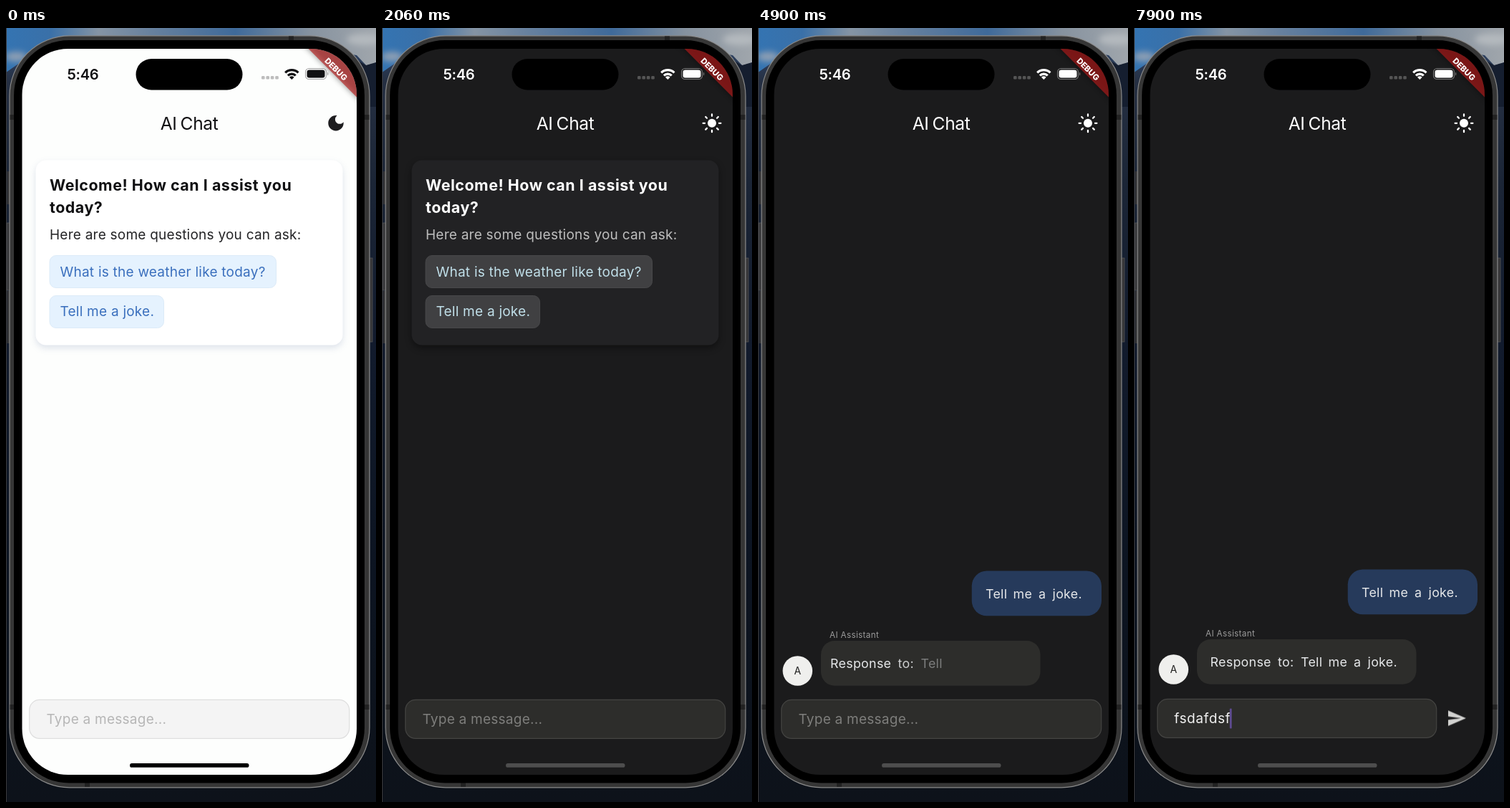
Animation of 517x1080 px, one loop 8 s. Source, as an HTML page:

```html
<!DOCTYPE html>
<html lang="en">
<head>
<meta charset="utf-8">
<title>AI Chat</title>
<style>
html, body { margin: 0; width: 100%; height: 100%; overflow: hidden; background: #0c1424; }
svg { display: block; width: 517px; height: 1080px; font: 400 19px Inter, "Noto Sans", sans-serif; }
text { white-space: pre; }

/* every step animation shares one 8 s clock */
.theme, .card, .chat, .user, .reply, .user .words, .reply .words, .field, .box,
.hint, .typed, .caret, .caret rect, .send {
  animation: 8s step-end infinite;
}

.theme { animation-name: theme; }
@keyframes theme {
  0%, 20% {
    --bg: #fdfefd; --ink: #101012; --sub: #242426; --card: #fff; --shade: rgba(40, 70, 130, .15);
    --chip: #e5f2fe; --chipEdge: #dcebf8; --chipInk: #3a6fbd; --field: #f4f4f4; --hint: #b6b6b6;
    --home: #000; --dots: #bdbdbd; --cell: #a5a5a5; --moon: 1; --sun: 0;
  }
  4.5%, 25%, 100% {
    --bg: #1b1b1c; --ink: #fff; --sub: #bebebe; --card: #222224; --shade: rgba(0, 0, 0, .4);
    --chip: #404042; --chipEdge: #48484a; --chipInk: #c0dfe9; --field: #2d2d2b; --hint: #7e7e7c;
    --home: #4e4e4e; --dots: #555; --cell: #777; --moon: 0; --sun: 1;
  }
  0%, 22% { --line: #dedede; }
  4.5%, 25% { --line: #e4e4e0; }
  5.375%, 25.75%, 100% { --line: #444442; }
  20% { --line: #a2a2a2; }
  21% { --line: #c8c8c8; }
}

.bg { fill: var(--bg); }
.ink { fill: var(--ink); }
.sub { fill: var(--sub); }
.moon { opacity: var(--moon); }
.sun { opacity: var(--sun); }
.plate { fill: var(--card); filter: drop-shadow(0 4px 5px var(--shade)); }
.chip rect { fill: var(--chip); stroke: var(--chipEdge); }
.chip text { fill: var(--chipInk); }
.soft { letter-spacing: .24px; }

.card { animation-name: card; }
@keyframes card { 0% { opacity: 1; } 47.5%, 100% { opacity: 0; } }

.user { animation-name: user; }
@keyframes user {
  0% { opacity: 0; transform: translateY(97.5px); }
  47.5% { opacity: 1; transform: translateY(97.5px); }
  59.125%, 100% { opacity: 1; transform: none; }
}
.reply { animation-name: reply; }
@keyframes reply { 0% { opacity: 0; } 59.125%, 100% { opacity: 1; } }
.chat { animation-name: lift; }
@keyframes lift { 0% { transform: none; } 94.125%, 100% { transform: translateY(-2px); } }

.words { font-size: 17.8px; letter-spacing: .32px; fill: #e6e8ea; }
.user .words { animation-name: settleUser; }
@keyframes settleUser { 0% { transform: translateX(-5.5px); } 52%, 100% { transform: none; } }
.reply .words { animation-name: settleReply; }
@keyframes settleReply { 0% { transform: translateX(-5.5px); } 67%, 100% { transform: none; } }

/* --t is the moment a word or a letter arrives */
.words text { animation: word 8s calc(var(--t) - 8s) infinite linear; }
@keyframes word {
  0% { opacity: 0; animation-timing-function: cubic-bezier(.5, 1, .89, 1); }
  2.06%, 60% { opacity: 1; }
  60.01%, 100% { opacity: 0; }
}
.typed tspan { animation: pop 8s calc(var(--t) - 8s) infinite step-end; }
@keyframes pop { 0% { visibility: visible; } 40%, 100% { visibility: hidden; } }

.field { animation-name: field; }
@keyframes field { 0% { transform: none; } 94.125%, 100% { transform: translateY(-1px); } }
.box { fill: var(--field); stroke: var(--line); stroke-width: 1.2; animation-name: box; }
@keyframes box { 0% { width: 447px; } 94.125%, 100% { width: 390px; } }
.hint { fill: var(--hint); letter-spacing: .25px; animation-name: hint; }
@keyframes hint { 0% { opacity: 1; } 94.125%, 100% { opacity: 0; } }
.typed, .send { animation-name: typed; }
@keyframes typed { 0% { opacity: 0; } 94.125%, 100% { opacity: 1; } }
.typed { letter-spacing: .6px; fill: #f0f0f0; }
.caret { animation-name: blink; }
@keyframes blink { 0% { opacity: 0; } 90.375%, 100% { opacity: 1; } }
.caret rect { animation-name: advance; }
@keyframes advance {
  0% { transform: none; }
  94.125% { transform: translateX(7.3px); }
  94.625% { transform: translateX(17.9px); }
  95.25% { transform: translateX(41.2px); }
  95.75% { transform: translateX(48.5px); }
  97.875% { transform: translateX(60.7px); }
  98.75%, 100% { transform: translateX(78.4px); }
}
</style>
</head>
<body>
<svg viewBox="0 0 517 1080">
  <defs>
    <linearGradient id="range" x2="0" y2="1">
      <stop offset="0" stop-color="#34517c"/>
      <stop offset=".07" stop-color="#252f42"/>
      <stop offset=".2" stop-color="#1b2536"/>
      <stop offset=".4" stop-color="#121b2d"/>
      <stop offset=".7" stop-color="#0c1421"/>
      <stop offset="1" stop-color="#0d121a"/>
    </linearGradient>
    <linearGradient id="sky">
      <stop offset="0" stop-color="#3474b2"/>
      <stop offset=".12" stop-color="#3a70a8"/>
      <stop offset=".25" stop-color="#8594a4"/>
      <stop offset=".4" stop-color="#66809e"/>
      <stop offset=".62" stop-color="#3f6a9a"/>
      <stop offset=".82" stop-color="#86929f"/>
      <stop offset="1" stop-color="#a0a6ac"/>
    </linearGradient>
    <filter id="blur" x="-50%" y="-50%" width="200%" height="200%"><feGaussianBlur stdDeviation="4"/></filter>
    <clipPath id="screen"><rect x="22.5" y="29" width="467.5" height="1013" rx="64"/></clipPath>
  </defs>

  <!-- wallpaper -->
  <rect width="517" height="1080" fill="url(#range)"/>
  <path d="M0 0H517V48L505 54 490 38 440 30H60L20 48 0 62Z" fill="url(#sky)"/>
  <g filter="url(#blur)">
    <ellipse cx="14" cy="40" rx="15" ry="7" fill="#8d9fb4"/>
    <ellipse cx="500" cy="16" rx="24" ry="8" fill="#b4b9be"/>
  </g>
  <path d="M470 30L489 44 503 52 517 48V110H470Z" fill="#151e2f"/>
  <rect width="1" height="1080" fill="#39393b"/>

  <!-- phone body -->
  <g fill="#343436">
    <rect x="507" y="321" width="5" height="117" stroke="#59595b" stroke-width=".7"/>
    <rect x="1.5" y="200" width="5" height="46"/>
    <rect x="1.5" y="272" width="5" height="94" stroke="#59595b" stroke-width=".7"/>
    <rect x="1.5" y="367" width="5" height="73"/>
  </g>
  <rect x="5" y="10.8" width="503" height="1049" rx="84" fill="#363636" stroke="#8b8b8b" stroke-width="1.2"/>
  <g fill="#222">
    <rect x="5.6" y="121" width="6" height="7"/><rect x="501" y="121" width="6.4" height="7"/>
    <rect x="5.6" y="944" width="6" height="7"/><rect x="501" y="944" width="6.4" height="7"/>
    <rect x="395" y="11.4" width="7" height="6"/><rect x="110" y="1053" width="7" height="6"/>
  </g>
  <rect x="11" y="17" width="490" height="1036.5" rx="77"/>

  <g class="theme" clip-path="url(#screen)">
    <rect class="bg" x="22" y="28" width="469" height="1015"/>

    <!-- status bar -->
    <text class="ink" x="85.5" y="71.5" font-size="20.2" font-weight="600" letter-spacing="-.3">5:46</text>
    <rect x="181.5" y="43" width="149" height="43.5" rx="21.7"/>
    <g style="fill:var(--dots)">
      <rect x="357" y="67" width="4.6" height="4.6" rx="1.4"/><rect x="363.4" y="67" width="4.6" height="4.6" rx="1.4"/>
      <rect x="369.8" y="67" width="4.6" height="4.6" rx="1.4"/><rect x="376.2" y="67" width="4.6" height="4.6" rx="1.4"/>
    </g>
    <g fill="none" stroke-width="3.2" style="stroke:var(--ink)">
      <path d="M390.2 62.4A13 13 0 0 1 408.4 62.4"/>
      <path d="M393.9 66.4A7.7 7.7 0 0 1 404.7 66.4"/>
    </g>
    <path class="ink" d="M399.3 72L396 68.7A4.7 4.7 0 0 1 402.6 68.7Z"/>
    <rect x="418.5" y="56.5" width="29" height="15" rx="5" fill="none" stroke-width="1.1" style="stroke:var(--cell)"/>
    <path d="M449 61.5a3 3 0 0 1 0 5z" style="fill:var(--cell)"/>
    <rect class="ink" x="420.5" y="58.5" width="25" height="11" rx="3.3"/>

    <!-- corner ribbon -->
    <g transform="translate(461.2 57.4) rotate(45)">
      <rect x="-60" y="-24" width="120" height="31.2" opacity=".45" filter="url(#blur)"/>
      <rect x="-60" y="-24" width="120" height="31.2" fill="#b71c1c" opacity=".64"/>
      <text y="4.1" font-size="11.3" font-weight="800" fill="#fff" text-anchor="middle">DEBUG</text>
    </g>

    <!-- title bar -->
    <text class="ink" x="215.8" y="142" font-size="24.5" letter-spacing="-.35" word-spacing="-1.5">AI Chat</text>
    <path class="moon" transform="translate(446.7 118.5) scale(1.188)" fill="#1d1d1f" d="M12 3c-4.97 0-9 4.03-9 9s4.03 9 9 9 9-4.03 9-9c0-.46-.04-.92-.1-1.36-.98 1.37-2.58 2.26-4.4 2.26-2.98 0-5.4-2.42-5.4-5.4 0-1.81.89-3.42 2.26-4.4-.44-.06-.9-.1-1.36-.1z"/>
    <g class="sun">
      <g transform="translate(461 132.8)" fill="#fff" stroke="#fff">
        <circle r="6" stroke="none"/>
        <path id="rays" d="M0-10V-12.4M0 10V12.4M-10 0H-12.4M10 0H12.4" stroke-width="2.3" stroke-linecap="round"/>
        <use href="#rays" transform="rotate(45)"/>
      </g>
    </g>

    <!-- welcome card -->
    <g class="card">
      <rect class="plate" x="41.5" y="184.5" width="429" height="258" rx="14.5"/>
      <g class="ink" font-size="21.4" font-weight="700" letter-spacing=".54">
        <text x="61" y="226.5">Welcome! How can I assist you</text>
        <text x="61" y="257.5">today?</text>
      </g>
      <text class="sub soft" x="61" y="295.3">Here are some questions you can ask:</text>
      <g class="chip soft">
        <rect x="61" y="317.5" width="316.5" height="45" rx="9"/>
        <text x="75.5" y="346.5">What is the weather like today?</text>
        <rect x="61" y="373.5" width="159.5" height="45" rx="9"/>
        <text x="75.5" y="402.3">Tell me a joke.</text>
      </g>
    </g>

    <!-- conversation -->
    <g class="chat">
      <g class="user">
        <rect x="298.7" y="757.5" width="181.3" height="62.8" rx="21" fill="#263a5b"/>
        <g class="words">
          <text x="318" y="795.6" style="--t:3.8s">Tell</text>
          <text x="356.5" y="795.6" style="--t:3.865s">me</text>
          <text x="392" y="795.6" style="--t:3.93s">a</text>
          <text x="411.5" y="795.6" style="--t:3.995s">joke.</text>
        </g>
      </g>
      <g class="reply">
        <text x="100" y="851.3" font-size="11.6" letter-spacing=".38" fill="#9c9c9c">AI Assistant</text>
        <circle cx="55.3" cy="897" r="20.8" fill="#efefed"/>
        <text x="55.3" y="902" font-size="14" fill="#222" text-anchor="middle">A</text>
        <rect x="88" y="855" width="306.5" height="62.8" rx="19" fill="#2d2d2b"/>
        <g class="words">
          <text x="106.5" y="893" style="--t:4.73s">Response</text>
          <text x="201" y="893" style="--t:4.795s">to:</text>
          <text x="233" y="893" style="--t:4.86s">Tell</text>
          <text x="271.5" y="893" style="--t:4.925s">me</text>
          <text x="307" y="893" style="--t:4.99s">a</text>
          <text x="326.5" y="893" style="--t:5.055s">joke.</text>
        </g>
      </g>
    </g>

    <!-- message field -->
    <g class="field">
      <rect class="box" x="32.7" y="937.4" width="447" height="54" rx="14.3"/>
      <text class="hint" x="56.5" y="971.4">Type a message...</text>
      <text class="typed" x="56.2" y="971.4"><tspan style="--t:7.53s">f</tspan><tspan style="--t:7.57s">s</tspan><tspan style="--t:7.62s">da</tspan><tspan style="--t:7.66s">f</tspan><tspan style="--t:7.83s">d</tspan><tspan style="--t:7.9s">sf</tspan></text>
      <g class="caret"><rect x="55.6" y="950.5" width="2.4" height="28" rx="1" fill="#6750a4"/></g>
      <g class="send">
        <path transform="translate(436.6 949.8) scale(1.188)" fill="#d2d2d0" d="M2.01 21L23 12 2.01 3 2 10l15 2-15 2z"/>
      </g>
    </g>

    <rect x="173" y="1026" width="166.5" height="5.8" rx="2.9" style="fill:var(--home)"/>
  </g>
</svg>
</body>
</html>
```
